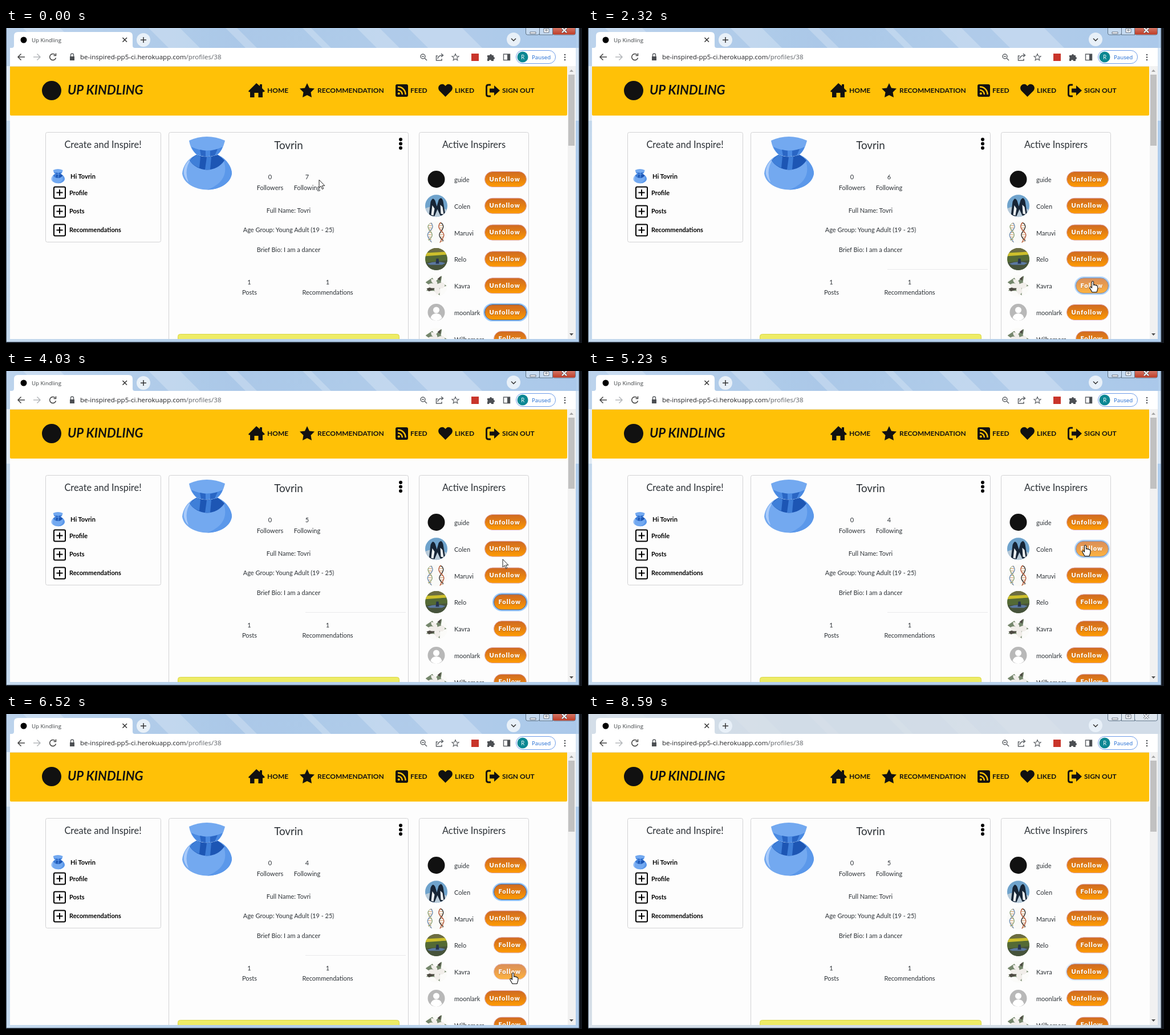
Write an HTML page that moves like this. It is 1010 px wide and 554 px high and loops after 8.61 s.

```html
<!DOCTYPE html>
<html lang="en">
<head>
<meta charset="utf-8">
<title>Profile page</title>
<style>
  html, body { margin: 0; width: 100%; height: 100%; overflow: hidden; background: #fdfdfd; }
  svg { display: block; width: 1010px; height: 554px; }
  text { font-family: Lato, sans-serif; font-size: 11px; fill: #2c3136; white-space: pre; }
  .ui { font-family: "Open Sans", sans-serif; }
  .mid { text-anchor: middle; }
  .bold { font-weight: 700; fill: #000; }
  .nav { font-size: 12px; font-weight: 700; fill: #111; }
  .title { font-size: 16.4px; }
  .heading { font-size: 18.8px; }
  .label { font-weight: 900; letter-spacing: 1.1px; fill: #fff; text-shadow: 0 1px 1px rgba(110, 50, 0, .45); }
  .line { fill: none; stroke: #5f6368; stroke-width: 1.5; }
  .card { fill: none; stroke: #d2d2d4; }
</style>
</head>
<body>
<svg id="stage" viewBox="0 0 1010 554">
  <defs>
    <linearGradient id="glass" x2="1" y2="0">
      <stop offset="0" stop-color="#c6daee"/><stop offset=".4" stop-color="#b1cdea"/>
      <stop offset=".75" stop-color="#b9d2ec"/><stop offset="1" stop-color="#b0cdec"/>
    </linearGradient>
    <linearGradient id="orange" x2="0" y2="1">
      <stop offset="0" stop-color="#cf6a22"/><stop offset=".45" stop-color="#e27d15"/><stop offset="1" stop-color="#ff9c00"/>
    </linearGradient>
    <linearGradient id="close" x2="0" y2="1">
      <stop offset="0" stop-color="#d98a7c"/><stop offset="1" stop-color="#bf3b25"/>
    </linearGradient>
    <clipPath id="page"><rect x="7" y="67" width="992" height="480"/></clipPath>
    <clipPath id="disc"><circle r="19.5"/></clipPath>
    <g id="bag">
      <path fill="#73a9f0" d="M333 223Q352 230 372 223C388 231 396 245 396 256C394 273 374 284.500 353 284.500S311 273 309 256C310 244 317 231 333 223Z"/>
      <path fill="#5b98ea" d="M380 228C391 237 396 248 396 256C394 273 374 284.500 353 284.500Q396 268 380 228Z"/>
      <path fill="#a9cbfa" d="M325 229C314 238 311 247 312 257Q315 267 320 271Q311 250 325 229Z"/>
      <path fill="#1d56b4" d="M334 223Q352 230 371 223Q378 227 383 233Q372 249 352 249.500Q332 248 322 233Q327 227 334 223Z"/>
      <path fill="#3f7fd8" d="M322 233L334 223L341 226L339 246Q328 242 322 233ZM352 227L360 226L358 249L349 249Z"/>
      <path fill="#73a9f0" d="M321 198Q352 184 384 198C381 210 377 218 370 223Q352 229 335 223C327 217 323 209 321 198Z"/>
      <path fill="#4a8ae2" d="M325 209Q352 222 380 209Q376 219 370 223Q352 229 335 223Q328 217 325 209Z"/>
      <path fill="#2a66c4" d="M340 214L350 216L350 226L342 225ZM358 216L371 213L366 224L358 226Z"/>
    </g>
    <g id="flower">
      <circle r="19.5" fill="#fbfbf9"/>
      <path fill="#75876c" d="M-19-6L-7-14L-2-7L10-18L8-6L18 0L6 5L6 17L-4 9L-18 9L-9 1Z"/>
      <path fill="#4d4a42" d="M-17 5L-5 1L-3 6L-13 10ZM2-12L8-17L7-9Z"/>
      <path fill="#f1eeea" d="M-9-12Q2-11 2-3Q14-9 15 0Q12 7 5 4Q10 12 2 16Q-5 11-3 4Q-13 6-14-2Q-9-6-4-3Q-10-6-9-12Z"/>
    </g>
    <g id="plus" fill="none" stroke="#000" stroke-width="2">
      <rect x="-10" y="-10" width="20" height="20" rx="2"/><path d="M-5.500 0H5.500M0-5.500V5.500"/>
    </g>
  </defs>

  <rect width="1010" height="554" fill="#12161d"/>
  <path d="M0 0H1005V552H0Z" fill="url(#glass)"/>
  <path d="M0 0H1000V35H7V67H0Z" fill="#8fb5df" opacity=".2"/>
  <g fill="#fff" opacity=".22">
    <path d="M30 0H95L130 35H65ZM250 0H305L340 35H285ZM385 0H405L440 35H420ZM520 0H535L570 35H555ZM615 0H655L690 35H650ZM705 0H800L835 35H740Z"/>
  </g>
  <path d="M0 67H7V163H0ZM999 35H1005V163H999Z" fill="#fff" opacity=".5"/>
  <path id="idleGlass" d="M0 0H1005V552H0Z" fill="#dbe1e8"/>
  <path d="M.5 0V552M1005 0V552.500H0" fill="none" stroke="#3e4c5c"/>
  <g stroke="#5f7488" fill="#fff" fill-opacity=".3">
    <rect x="911.500" y="-5" width="24" height="17" rx="3"/><rect x="935.500" y="-5" width="23" height="17"/>
    <rect x="958.500" y="-5" width="40" height="17" rx="3"/>
  </g>
  <rect id="closeRed" x="959" y="-4" width="39" height="15.500" rx="2" fill="url(#close)"/>
  <path d="M919 7H929V10H919ZM943 1H952V8H943ZM946 3H949V5H946Z" fill="#fff" stroke="#4a5565" stroke-width=".8"/>
  <path d="M975 0L983 8M983 0L975 8" stroke="#4a5565" stroke-width="3.500"/><path d="M975 0L983 8M983 0L975 8" stroke="#fff" stroke-width="2"/>

  <path fill="#fff" d="M7 35H10Q14 35 14 31V14Q14 7 21 7H215Q222 7 222 14V31Q222 35 226 35H999V67H7Z"/>
  <circle cx="31" cy="21" r="5.500"/>
  <text class="ui" x="45" y="24.500" style="font-size:9.700px;fill:#3c4043">Up Kindling</text>
  <path class="line" d="M204.500 17L212 24.500M212 17L204.500 24.500" style="stroke:#333"/>
  <g fill="#e8f0f8"><circle cx="241" cy="21" r="12"/><circle cx="890" cy="20" r="12"/></g>
  <path class="line" d="M236 21H246M241 16V26M886 18.500L890 22.500L894 18.500" style="stroke:#333"/>

  <g class="line">
    <path d="M33 51H21M26.500 45.500L21 51L26.500 56.500" stroke="#444"/>
    <path d="M48 51H60M54.500 45.500L60 51L54.500 56.500" stroke="#b5b8bb"/>
    <path d="M86 47A5.500 5.500 0 1 0 87.500 52.500M87.500 44.500V48.500H83.500" stroke="#444"/>
    <path d="M113.500 50V47.500A2.500 2.500 0 0 1 118.500 47.500V50"/>
    <circle cx="731" cy="50" r="4"/><path d="M734 53L738 57M729 50H733"/>
    <path d="M757 49H754.500V57H764V54M757 54Q758 48 766 48M763 45L766.500 48L763 51"/>
    <path d="M788 45.500L789.700 49.500L794 49.800L790.700 52.500L791.800 56.800L788 54.500L784.200 56.800L785.300 52.500L782 49.800L786.300 49.500Z" stroke-width="1.200"/>
    <rect x="872.500" y="46" width="11" height="10.500"/>
  </g>
  <path fill="#4c4f53" d="M112 50H120V57H112ZM879 46H884V57H879ZM844 48H848A2 2 0 1 1 852 48H855V51A2 2 0 1 1 855 55V58H851A2 2 0 0 0 847 58H844V54A1.800 1.800 0 0 0 844 51Z"/>
  <rect x="816" y="45" width="13" height="13" fill="#c9352b"/>
  <text class="ui" x="130" y="55" style="font-size:11.560px;fill:#202124">be-inspired-pp5-ci.herokuapp.com<tspan fill="#5f6368">/profiles/38</tspan></text>
  <rect x="894.500" y="39.500" width="69" height="23" rx="11.500" fill="#fff" stroke="#6b9be8"/>
  <circle cx="906" cy="51" r="9.500" fill="#0b8793"/>
  <text class="ui mid" x="906" y="54.500" style="font-size:10px;fill:#fff">R</text>
  <text class="ui" x="922" y="54.500" style="font-size:9.700px;fill:#1967d2">Paused</text>
  <g fill="#4c4f53"><circle cx="980" cy="47" r="1.300"/><circle cx="980" cy="51.500" r="1.300"/><circle cx="980" cy="56" r="1.300"/></g>

  <g clip-path="url(#page)">
    <rect x="7" y="67" width="992" height="480" fill="#fdfdfd"/>
    <rect x="985" y="67" width="14" height="480" fill="#f1f1f1"/>
    <rect x="986" y="82" width="11" height="125" fill="#c1c1c1"/>
    <path d="M988 77L991.500 73L995 77Z" fill="#a3a3a3"/><path d="M988 537L991.500 541L995 537Z" fill="#505050"/>
    <path d="M7 68H984V152Q984 154 982 154H9Q7 154 7 152Z" fill="#ffc107"/>
    <path d="M7 67.500H984" stroke="#e6dcc0"/>
    <circle cx="80" cy="110" r="17" fill="#111"/>
    <text x="108" y="117" style="font-size:22.200px;font-weight:700;font-style:italic;fill:#111">UP KINDLING</text>

    <g fill="#111">
      <path d="M439 97L445 102V99H449V106L454 111L452 112.500H450V122H442.500V114H435.500V122H428V112.500H426L425 111Z"/>
      <path d="M528 97L532 105.500L541 106.500L534.500 113L536 122L528 118L520 122L521.500 113L515 106.500L524 105.500Z"/>
      <rect x="683" y="99" width="22" height="22" rx="3"/>
      <path d="M770.500 121L760 110.500C755 104 761 97 767 99Q769 100 770.500 102Q772 100 774 99C780 97 786 104 781 110.500Z"/>
      <path d="M848 106.500H856V101L866 110L856 119V113.500H848Z"/>
    </g>
    <path d="M850 100H846Q842.500 100 842.500 103.500V116.500Q842.500 120 846 120H850" fill="none" stroke="#111" stroke-width="3"/>
    <path d="M687 103.500A13 13 0 0 1 700.500 117M687 109A8 8 0 0 1 695 117" fill="none" stroke="#ffc107" stroke-width="2.500"/>
    <circle cx="688.800" cy="115.200" r="2" fill="#ffc107"/>

    <rect class="card" x="69.500" y="183.500" width="202" height="193" rx="3"/>
    <rect class="card" x="285.500" y="183.500" width="420" height="400" rx="3"/>
    <rect class="card" x="724.500" y="183.500" width="192" height="400" rx="3"/>
    <use href="#bag"/>
    <use href="#bag" transform="translate(-4 196.500) scale(.27)"/>
    <use href="#plus" x="94" y="289.500"/><use href="#plus" x="94" y="322.500"/><use href="#plus" x="94" y="355.500"/>
    <circle cx="692" cy="196" r="3"/><circle cx="692" cy="203.500" r="3"/><circle cx="692" cy="211" r="3"/>
    <path id="rule" d="M525 424.500H701" stroke="#e9e9ea"/>
    <rect x="301.500" y="538.500" width="388" height="30" rx="4" fill="#eeec66" stroke="#d9d648"/>
    <g id="copy"></g>
    <g id="rows"></g>
  </g>
  <path id="arrow" d="M0 0V14L3.200 11L5.500 16.500L7.700 15.500L5.400 10.300H9.800Z" fill="#fff" stroke="#222" stroke-width="1"/>
  <path id="hand" d="M-1.500 1.500Q0-1 1.500 1.500V7Q3.200 5.500 4 7.500Q5.800 6.300 6.600 8.300Q8.600 7.500 8.800 10V14L7 19.500H-1L-5 12.500Q-5.500 9.500-3 10.500L-1.500 12Z" fill="#fff" stroke="#111" stroke-width="1.100"/>
</svg>
<script>
const $ = id => document.getElementById(id);
const LOOP = 8610, ROW_STEP = 46.8;

const copy = [
  ['title mid', 170, 210.5, 'Create and Inspire!'], ['title mid', 820.5, 210.5, 'Active Inspirers'],
  ['heading mid', 495.5, 213, 'Tovrin'],
  ['bold', 113, 264.5, 'Hi Tovrin'], ['bold', 111, 294, 'Profile'],
  ['bold', 111, 326, 'Posts'], ['bold', 111, 359, 'Recommendations'],
  ['mid', 463, 266, '0'], ['mid', 463, 284.5, 'Followers'], ['mid', 528, 284.5, 'Following'],
  ['mid', 495.5, 324.5, 'Full Name: Tovri'], ['mid', 495.5, 359, 'Age Group: Young Adult (19 - 25)'],
  ['mid', 495.5, 393.5, 'Brief Bio: I am a dancer'],
  ['mid', 426.5, 450.5, '1'], ['mid', 427, 469, 'Posts'],
  ['mid', 564, 450.5, '1'], ['mid', 564, 469, 'Recommendations'],
  ['nav', 458, 114, 'HOME'], ['nav', 546, 114, 'RECOMMENDATION'], ['nav', 709, 114, 'FEED'],
  ['nav', 787, 114, 'LIKED'], ['nav', 870, 114, 'SIGN OUT']
];
$('copy').innerHTML = copy.map(([kind, x, y, words]) =>
  `<text class="${kind}" x="${x}" y="${y}">${words}</text>`
).join('') + '<text id="count" class="mid" x="528" y="266"></text>';

// Two crossing strands with rungs.
function helix(x, tilt, front, back) {
  const strand = sign => 'M' + Array.from({ length: 19 }, (_, i) =>
    `${(sign * 4 * Math.sin(i / 2.4)).toFixed(1)} ${i * 2 - 18}`).join('L');
  const rungs = Array.from({ length: 9 }, (_, i) => `M-3 ${i * 4 - 16}H3`).join('');
  return `<g transform="translate(${x}) rotate(${tilt})" fill="none" stroke-width="1.4">
    <path d="${rungs}" stroke="#d69a62" stroke-width="1"/>
    <path d="${strand(1)}" stroke="${front}"/><path d="${strand(-1)}" stroke="${back}"/></g>`;
}

const flower = '<use href="#flower"/>';
const people = [
  ['guide', '<circle r="15" fill="#111"/>'],
  ['Colen', `<rect x="-20" y="-20" width="40" height="40" fill="#6fa3cc"/>
    <path d="M-20 5Q0-5 20 8V20H-20Z" fill="#b8cad8"/>
    <path d="M-13 18L-10-7Q-6-17-2-9L1 1L4-10Q9-18 12-8L16 17H7L2 6L-3 18Z" fill="#172536"/>
    <path d="M-9 16L-7-1L-3 5L-5 17ZM8 14L7-2L11 2L13 15Z" fill="#edf1f3"/>`],
  ['Maruvi', '<circle r="19.5" fill="#fafaf8"/>'
    + helix(-11, 3, '#6f8fb4', '#8ea67c') + helix(9, -4, '#333', '#b4573a')],
  ['Relo', `<rect x="-20" y="-20" width="40" height="40" fill="#546a35"/>
    <rect x="-20" y="-20" width="40" height="8" fill="#6c6c42"/>
    <path d="M-20-11L20-13V-8L-20-5Z" fill="#cdbf2c"/><path d="M-20 6L20 2V20H-20Z" fill="#46533b"/>
    <path d="M-16 8Q0 2 16 7L10 10H-11Z" fill="#5c79a2"/><path d="M0-1H4L5 8H-1Z" fill="#26344f"/>`],
  ['Kavra', flower],
  ['moonlark', `<circle r="15" fill="#b8b8b8"/><circle cy="-4" r="5.5" fill="#fff"/>
    <path d="M-10 10Q-8 2 0 2T10 10Q5 15 0 15T-10 10Z" fill="#fff"/>`],
  ['Wilhemora', flower]
];
const rowY = i => 266 + i * ROW_STEP;
$('rows').innerHTML = people.map(([name, art], i) => `
  <g transform="translate(754.5 ${rowY(i)})" clip-path="url(#disc)">${art}</g>
  <text x="786" y="${rowY(i) + 5}">${name}</text>
  <g class="btn" transform="translate(0 ${rowY(i)})">
    <rect class="body" y="-13.500" height="27" rx="13.500" fill="url(#orange)" stroke="#dba0a4"/>
    <g class="ring" fill="none">
      <rect y="-14.800" height="29.600" rx="14.800" stroke="#9ccafb" stroke-width="2.600"/>
      <rect y="-13.500" height="27" rx="13.500" stroke="#41608c"/>
    </g>
    <text class="label" y="3.500"></text>
  </g>`).join('');
const buttons = [...document.querySelectorAll('.btn')].map(group => ({
  group, rects: [...group.querySelectorAll('rect')],
  ring: group.querySelector('.ring'), label: group.querySelector('.label')
}));

// Pointer moves: start, end, number of steps, destination.
const moves = [
  [70, 570, 9, 694, 405], [820, 1470, 11, 889, 456],
  [2320, 2320, 1, 885, 445], [2370, 2560, 4, 878, 412], [2700, 2700, 1, 878, 413],
  [3800, 4030, 5, 871, 331], [4087, 4310, 5, 872, 306],
  [5470, 5950, 9, 889, 459], [6130, 6180, 2, 889, 455], [7360, 7600, 5, 886, 560]
];
// Clicks: press, response, row.
const clicks = [[1770, 2060, 4], [3310, 3540, 3], [4870, 5230, 1], [6520, 6800, 4]];

function pointerAt(t) {
  let x = 549, y = 267;
  for (const [start, end, steps, toX, toY] of moves) {
    if (t < start) break;
    const done = end > start ? Math.floor((t - start) * (steps - 1) / (end - start) + 1e-6) + 1 : steps;
    const p = Math.min(1, done / steps);
    x += (toX - x) * p;
    y += (toY - y) * p;
  }
  return [x, y];
}

function ringLevels(t) {
  const levels = people.map((_, i) => i === 5 ? 1 : 0);
  let focused = 5;
  for (const [press, , row] of clicks) {
    if (t < press) break;
    const p = Math.min(1, (t - press) / 150);
    levels[focused] = 1 - p;
    levels[row] = p;
    focused = row;
  }
  return levels;
}

function draw(t) {
  const idle = t < 8530 ? 0 : t < 8590 ? .5 : 1;
  const [x, y] = pointerAt(t);
  const following = people.map((_, i) => i < 6);
  for (const [, response, row] of clicks) if (t >= response) following[row] = !following[row];
  const rings = ringLevels(t);
  let overButton = false;

  buttons.forEach(({ group, rects, ring, label }, i) => {
    const left = following[i] ? 839 : 855;
    const hover = x >= left && x <= 913 && Math.abs(y - rowY(i)) <= 14 && y < 547;
    overButton ||= hover;
    [.5, -.8, .5].forEach((inset, k) => {
      rects[k].setAttribute('x', left + inset);
      rects[k].setAttribute('width', 913 - left - 2 * inset);
    });
    label.textContent = following[i] ? 'Unfollow' : 'Follow';
    label.setAttribute('x', left + 8.5);
    ring.setAttribute('opacity', rings[i] * (1 - .75 * idle));
    group.setAttribute('opacity', hover ? .75 : 1);
  });

  $('count').textContent = following.filter(Boolean).length + 1;
  $('rule').setAttribute('opacity', t >= 2060 && t < 8530 ? 1 : 0);
  $('idleGlass').setAttribute('opacity', idle * .8);
  $('closeRed').setAttribute('opacity', 1 - idle);
  for (const id of ['arrow', 'hand']) {
    $(id).setAttribute('transform', `translate(${Math.round(x)} ${Math.round(y)})`);
    $(id).setAttribute('visibility', (id === 'hand') === overButton ? 'visible' : 'hidden');
  }
}

const began = performance.now();
function tick() {
  draw((performance.now() - began) % LOOP);
  requestAnimationFrame(tick);
}
tick();
</script>
</body>
</html>
```
